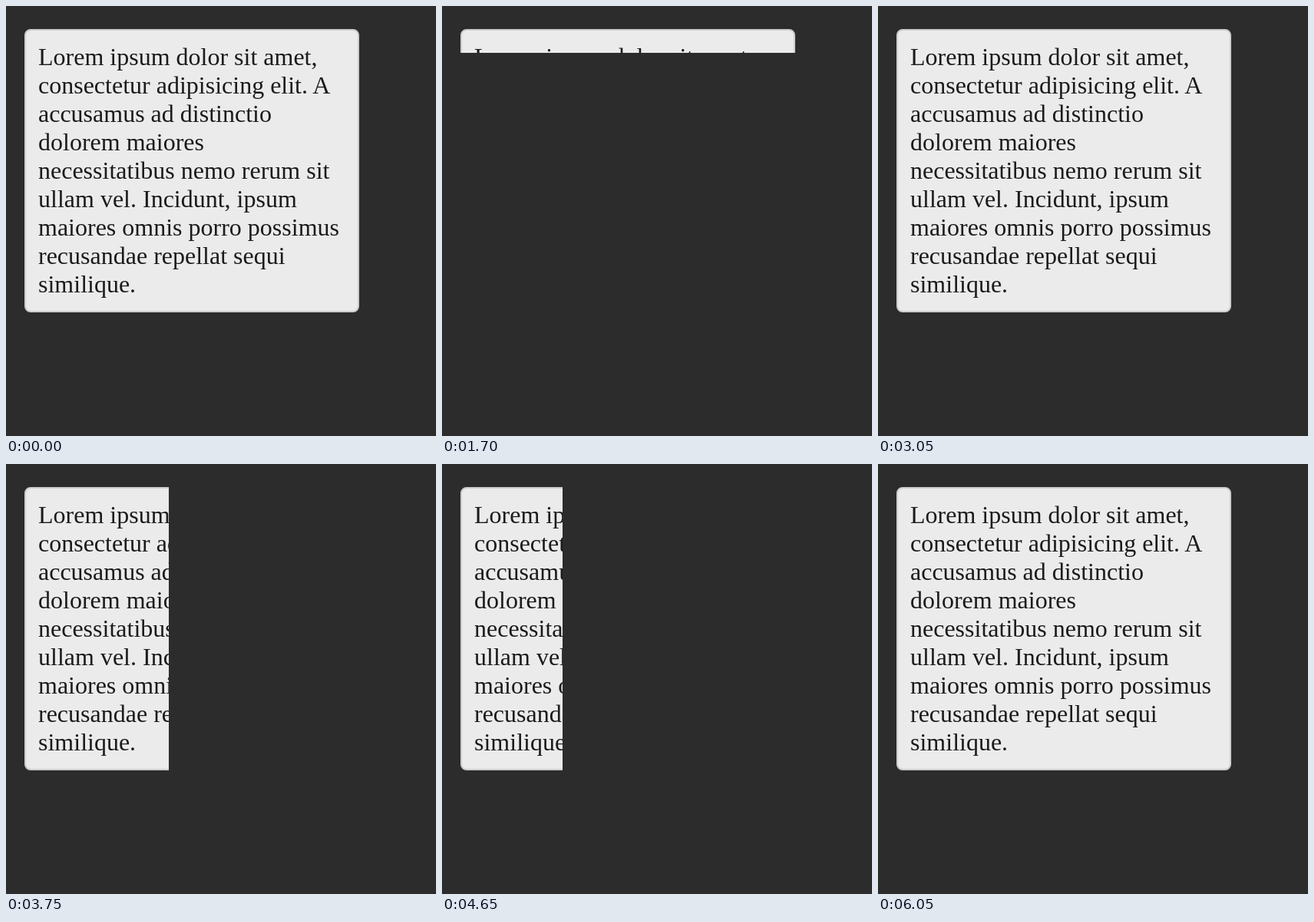
An HTML page that plays this animation: 560x560 px, repeating every 6.25 s.

```html
<!DOCTYPE html>
<html lang="la">
<head>
<meta charset="utf-8">
<title>Slide toggle</title>
<style>
  html, body {
    margin: 0;
    width: 100%;
    height: 100%;
    overflow: hidden;
    background: #2c2c2c;
  }
  #card {
    position: absolute;
    left: 24px;
    top: 30px;
    box-sizing: border-box;
    width: 436px;
    height: 369px;
    padding: 16px;
    border: 2px solid #cecccd;
    border-radius: 8px;
    background: #ebebeb;
    color: #1b1b1d;
    font: 32px/37px "Liberation Serif", Times, serif;
    text-rendering: optimizeLegibility;
    white-space: pre;
  }
</style>
</head>
<body>
<div id="card">Lorem ipsum dolor sit amet,
consectetur adipisicing elit. A
accusamus ad distinctio
dolorem maiores
necessitatibus nemo rerum sit
ullam vel. Incidunt, ipsum
maiores omnis porro possimus
recusandae repellat sequi
similique.</div>
<script>
  const LOOP = 6250, TICK = 50, W = 436, H = 369;
  const card = document.getElementById('card');

  const slides = [
    { axis: 'y', start: 759, length: 300, open: false },
    { axis: 'y', start: 1672, length: 300, open: true },
    { axis: 'x', start: 3701, length: 149, open: false },
    { axis: 'x', start: 4601, length: 240, open: true },
  ];

  const bezier = (a, b, u) =>
    3 * a * u * (1 - u) ** 2 + 3 * b * u * u * (1 - u) + u ** 3;

  // The CSS "ease" curve, solved by bisection.
  function ease(x) {
    if (x <= 0) return 0;
    if (x >= 1) return 1;
    let lo = 0, hi = 1;
    for (let i = 0; i < 24; i++) {
      const mid = (lo + hi) / 2;
      if (bezier(0.25, 0.25, mid) < x) lo = mid;
      else hi = mid;
    }
    return bezier(0.1, 1, lo);
  }

  function draw() {
    const t = Math.floor((performance.now() % LOOP) / TICK) * TICK;
    const slide = slides.filter(s => s.start <= t).pop();
    let right = 0, bottom = 0;
    if (slide) {
      const p = ease((t - slide.start) / slide.length);
      const hidden = slide.open ? 1 - p : p;
      if (slide.axis === 'x') right = Math.round(hidden * W);
      else bottom = Math.round(hidden * H);
    }
    card.style.clipPath = `inset(0 ${right}px ${bottom}px 0)`;
    requestAnimationFrame(draw);
  }
  draw();
</script>
</body>
</html>
```
